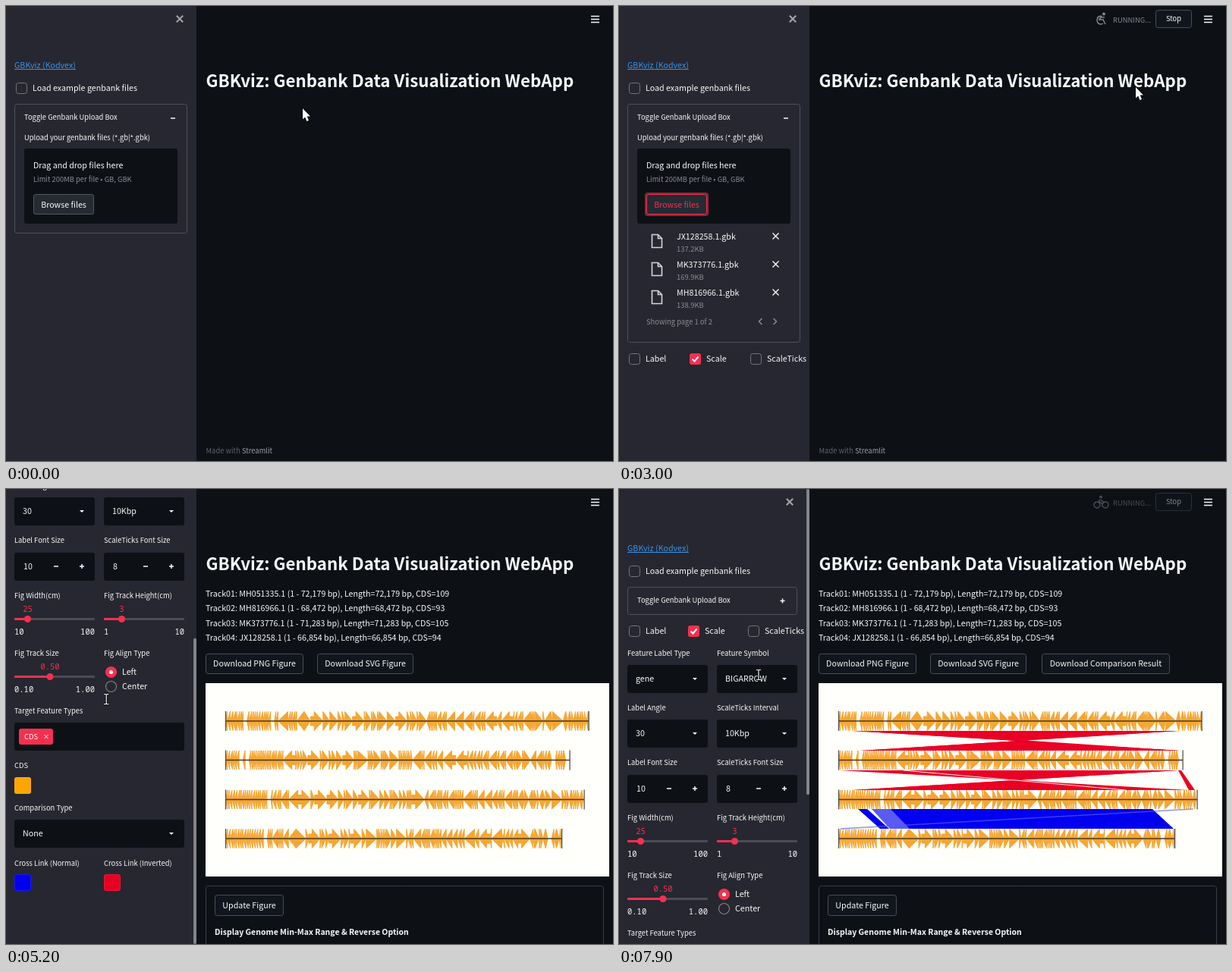
These frames come from a looping animation (800 by 600 pixels, 8000 ms). An HTML page with a canvas:

```html
<!DOCTYPE html>
<html lang="en">
<head>
<meta charset="utf-8">
<title>GBKviz</title>
<style>
html, body { margin: 0; width: 100%; height: 100%; overflow: hidden; background: #0e1117; }
canvas { display: block; }
</style>
</head>
<body>
<canvas id="stage" width="800" height="600"></canvas>
<script>
const g = document.getElementById('stage').getContext('2d');
const APP = "'Noto Sans CJK JP','Noto Sans CJK SC','Noto Sans CJK','Noto Sans',sans-serif";
const DESK = "'Noto Sans','Noto Sans CJK JP',sans-serif";
const MONO = "'Noto Sans Mono','Liberation Mono',monospace";
const WHITE = '#fafafa', DARK = '#0d1116', PANEL = '#262730', RED = '#f5304f', GREY = '#8b8d94', LINE = '#50525b';
const BODY = 10.7, SMALL = 9.4;

// ---------- drawing helpers ----------
function text(s, x, cy, o = {}) {
  const size = o.size || BODY;
  g.font = `${o.bold ? 'bold ' : ''}${size}px ${o.font || APP}`;
  g.textAlign = o.align || 'left';
  g.fillStyle = o.color || WHITE;
  g.fillText(s, x, cy + size * 0.36);
}
const small = (s, x, y, color) => text(s, x, y, { size: SMALL, color });

function box(x1, y1, x2, y2, fill, stroke, r = 3) {
  g.beginPath();
  g.roundRect(x1, y1, x2 - x1, y2 - y1, r);
  if (fill) { g.fillStyle = fill; g.fill(); }
  if (stroke) {
    g.beginPath();
    g.roundRect(x1 + .5, y1 + .5, x2 - x1 - 1, y2 - y1 - 1, r);
    g.strokeStyle = stroke; g.lineWidth = 1; g.stroke();
  }
}
function poly(points, fill, outline) {
  g.beginPath();
  points.forEach(p => g.lineTo(...p));
  g.closePath();
  g.fillStyle = fill; g.fill();
  if (outline) { g.strokeStyle = fill; g.lineWidth = outline; g.stroke(); }
}
function disc(x, y, r, fill) {
  g.beginPath(); g.arc(x, y, r, 0, 7); g.fillStyle = fill; g.fill();
}
function stroke(d, x, y, color, width = 1.5) {
  g.save(); g.translate(x, y);
  g.strokeStyle = color; g.lineWidth = width; g.stroke(new Path2D(d));
  g.restore();
}
function clipped(x, y, w, h, draw) {
  g.save(); g.beginPath(); g.rect(x, y, w, h); g.clip(); draw(); g.restore();
}
const minus = (x, y, color = WHITE) => stroke('M-3 0H3', x, y, color);
const plus = (x, y, color = WHITE) => stroke('M-3 0H3M0-3V3', x, y, color);
const cross = (x, y, r, color, w) => stroke(`M${-r} ${-r}L${r} ${r}M${r} ${-r}L${-r} ${r}`, x, y, color, w);
const caret = (x, y, color = WHITE, r = 3) => poly([[x - r, y - r / 2], [x + r, y - r / 2], [x, y + r / 2]], color);

function button(label, x1, y1, x2, y2, size) {
  box(x1, y1, x2, y2, '#11151d', '#4a4c54');
  text(label, (x1 + x2) / 2, (y1 + y2) / 2, { align: 'center', size });
}

// ---------- timeline ----------
function track(keys, t) {
  const i = keys.findIndex(k => k[0] > t);
  if (i < 0) return keys[keys.length - 1].slice(1);
  if (i === 0) return keys[0].slice(1);
  const [a, b] = [keys[i - 1], keys[i]], u = (t - a[0]) / (b[0] - a[0]);
  return a.slice(1).map((v, k) => v + (b[k + 1] - v) * u);
}
const pointerPath = [
  [0, 391, 135], [100, 306, 157], [200, 306, 157], [500, 80, 260], [1100, 80, 260], [1500, 300, 178],
  [1800, 303, 246], [2000, 303, 246], [2200, 690, 80], [2400, 690, 80], [2500, 681, 107], [3000, 681, 107],
  [3400, 215, 146], [3800, 215, 146], [4200, 134, 232], [5100, 134, 232], [5600, 125, 458], [5800, 125, 458],
  [6200, 98, 397], [6700, 98, 397], [7300, 229, 402], [7500, 229, 402], [7800, 184, 245]];
const scrollPath = [[4600, 0], [4900, 293], [6700, 293], [7000, 0]];
const expandPath = [[2700, 134], [2800, 278], [3400, 278], [3700, 0]];
const within = (t, a, b) => t >= a && t < b;

// ---------- sidebar ----------
function checkbox(x, y, label, labelX, checked) {
  box(x, y - 7, x + 15, y + 8, checked ? RED : null, checked ? RED : '#74757c');
  if (checked) stroke('M-4 0L-1 3L4-3', x + 7.5, y + .5, '#fff', 2);
  text(label, labelX, y);
}
function select(x, y, width, value, border) {
  box(x, y - 18, x + width, y + 19, DARK, border);
  text(value, x + 11, y + .5);
  caret(x + width - 17, y + .5);
}
function numberInput(x, y, value, hot) {
  box(x, y - 18, x + 106, y + 19, DARK);
  if (hot) box(x + 72, y - 18, x + 106, y + 19, RED);
  text(value, x + 12, y);
  minus(x + 55, y); plus(x + 89, y);
}
function slider(x, y, value, at, lo, hi) {
  const mono = { font: MONO, size: 10.5 };
  text(value, at, y - 13, { ...mono, color: RED, align: 'center' });
  box(x, y - 1, x + 106, y + 2, '#4b4c55', null, 1);
  box(x, y - 1, at, y + 2, RED, null, 1);
  disc(at, y + .5, 4.6, RED);
  text(lo, x, y + 17, mono);
  text(hi, x + 106, y + 17, { ...mono, align: 'right' });
}
function radio(y, label, on) {
  disc(138.5, y, 7.6, on ? RED : '#85868c');
  disc(138.5, y, on ? 2.6 : 6.5, on ? '#fff' : PANEL);
  text(label, 153, y);
}

function uploader(t, right, extra) {
  small('Upload your genbank files (*.gb|*.gbk)', 24, 173.5);
  box(24, 188, right - 13, 287, DARK);
  text('Drag and drop files here', 36, 210);
  small('Limit 200MB per file • GB, GBK', 36, 228.5, GREY);
  const hot = within(t, 500, 3300);
  if (hot) box(34, 246, 118, 277, '#8d2539', null, 4);
  box(36, 248, 116, 275, '#262a33', hot ? RED : '#555760');
  text('Browse files', 76, 262, { align: 'center', color: hot ? RED : WHITE });
  if (extra <= 134 && t < 2800) return;
  [['JX128258.1.gbk', '137.2KB'], ['MK373776.1.gbk', '169.9KB'], ['MH816966.1.gbk', '138.9KB']].forEach(([name, size], i) => {
    const y = 304 + 37 * i;
    stroke('M-6-8H2L7-3V9H-6ZM2-8V-3H7', 49.5, y + 5.5, '#d5d6d9', 1.6);
    text(name, 76, y);
    small(size, 76, y + 17, GREY);
    cross(206.5, y - .5, 4, WHITE, 1.4);
  });
  small('Showing page 1 of 2', 36, 416.5, GREY);
  stroke('M2-4L-2 0L2 4M17-4L21 0L17 4', 186.5, 416, GREY);
}

function widgets(t) {
  [[11, 'Feature Label Type', 'gene', 'Label Angle', '30', 'Label Font Size', '10'],
   [129, 'Feature Symbol', 'BIGARROW', 'ScaleTicks Interval', '10Kbp', 'ScaleTicks Font Size', '8']]
    .forEach(([x, l1, v1, l2, v2, l3, v3], i) => {
      small(l1, x, 216.5); select(x, 250, 106, v1);
      small(l2, x, 288.5); select(x, 322, 106, v2);
      small(l3, x, 361); numberInput(x, 395, v3, i && within(t, 7300, 7600));
    });
  small('Fig Width(cm)', 11, 433.5); slider(11, 464, '25', 28.5, '10', '100');
  small('Fig Track Height(cm)', 129, 433.5); slider(129, 464, '3', 152.5, '1', '10');
  small('Fig Track Size', 11, 509.5); slider(11, 540, '0.50', 58, '0.10', '1.00');
  small('Fig Align Type', 129, 509.5);
  radio(534.5, 'Left', true); radio(553.5, 'Center', false);
  small('Target Feature Types', 11, 585.5);
  box(11, 601, 235, 638, DARK);
  box(17, 609, 62, 630, RED); small('CDS', 24, 619.5); cross(53, 619.5, 2.5, WHITE, 1);
  const rim = 'rgba(250,250,250,.1)';
  small('CDS', 11, 658); box(11, 673, 33, 695, '#ffa500', rim);
  small('Comparison Type', 11, 714);
  const open = within(t, 5800, 6500);
  select(11, 747, 224, t < 6500 ? 'None' : 'Protein Many-to-Many', open && '#d8354f');
  if (open) box(50, 740, 51, 755, WHITE, null, 0);
  small('Cross Link (Normal)', 11, 786.5); box(11, 801, 33, 823, '#0000f0', rim);
  small('Cross Link (Inverted)', 129, 786.5); box(129, 801, 151, 823, '#e60022', rim);
}

function dropdown(py) {
  g.save();
  g.shadowColor = 'rgba(0,0,0,.5)'; g.shadowBlur = 8;
  box(11, 273, 235, 430, DARK);
  g.restore();
  const row = Math.floor((py - 274) / 30), hot = row > 4 ? 0 : row;
  box(11, 280 + hot * 30, 235, 310 + hot * 30, PANEL, null, 0);
  ['None', 'Nucleotide One-to-One', 'Nucleotide Many-to-Many', 'Protein One-to-One', 'Protein Many-to-Many']
    .forEach((s, i) => text(s, 23, 294.5 + 30 * i));
}

function sidebar(t, py) {
  const scroll = Math.round(track(scrollPath, t)[0]), extra = Math.round(track(expandPath, t)[0]);
  const full = t >= 3100, right = full ? 235 : 239;
  box(0, 0, 251, 600, PANEL, null, 0);
  clipped(0, 0, 249, 600, () => {
    g.translate(0, -scroll);
    cross(full ? 225 : 229, 17, 4.2, '#a0a1a6', 2.2);
    const link = 'GBKviz (Kodvex)';
    text(link, 11, 78, { color: '#3795ec' });
    box(11, 83, 11 + g.measureText(link).width, 84, '#3795ec', null, 0);
    checkbox(13, 108, 'Load example genbank files', 35);
    box(11, 129, right, 166 + extra, null, LINE);
    small('Toggle Genbank Upload Box', 24, 146.5);
    if (extra) {
      minus(right - 19, 148);
      clipped(11, 160, 228, 5 + extra, () => uploader(t, right, extra));
    } else plus(215.5, 147.5);
    if (t >= 2800) {
      g.translate(0, extra);
      checkbox(13, 187, 'Label', 35);
      checkbox(full ? 91 : 93, 187, 'Scale', full ? 113 : 115, true);
      checkbox(full ? 170 : 173, 187, 'ScaleTicks', full ? 192 : 195);
      if (full) widgets(t);
    }
  });
  const open = within(t, 5800, 6500);
  if (open) dropdown(py);
  else if (full) {
    const k = 600 / (893 + extra);
    box(247, scroll * k, 251, scroll * k + 600 * k, '#84858a', null, 2);
  }
}

// ---------- genome figure ----------
const ENDS = [768, 743, 762, 732.5], MIDS = [306, 357.5, 409.5, 461];

function genome(x0, x1, y, seed) {
  const random = () => (seed = (seed * 16807) % 2147483647) / 2147483647;
  for (let x = x0; x < x1 - 1;) {
    const f = (x - x0) / (x1 - x0), edge = f < .12 || f > .92;
    const w = Math.min(edge ? 1.8 + random() * 2 : 2 + random() ** 3 * 15, x1 - x);
    const leftward = f < .2 || (f > .54 && f < .82) || (f > .82 && random() < .5);
    const tip = leftward ? x : x + w, base = leftward ? x + w : x;
    const neck = w > 14 ? base + (tip - base) * .3 : base;
    poly([[tip, y], [neck, y - 12.5], [neck, y - 6], [base, y - 6], [base, y + 6], [neck, y + 6], [neck, y + 12.5]], '#f5a632', 1);
    x += w + (edge && random() < .14 ? 5 : .1);
  }
  box(x0, y - .7, x1, y + .7, '#4b3823', null, 0);
  box(x0 - .5, y - 13, x0 + .7, y + 13, '#444', null, 0);
  box(x1 - .5, y - 13, x1 + .7, y + 13, '#444', null, 0);
}

// An inverted match: two facing spans whose ends cross over.
const bowtie = (y, a, b, c, d, fill) => poly([[a, y], [b, y], [c, y + 26], [d, y + 26]], fill);

function figure(compared) {
  box(263, 256, 795, 511, '#fffffb', null, 0);
  MIDS.forEach((y, i) => genome(289.5, ENDS[i], y, 7919 * (i + 3)));
  if (!compared) return;
  const red = '#ea0024', blue = '#0000f0', pale = '#5a5af4';
  bowtie(319, 308, 738, 318, 738, red);
  bowtie(319, 350, 738, 318, 738, red);
  bowtie(319, 308, 690, 360, 738, red);
  bowtie(371, 290, 737, 308, 750, red);
  bowtie(371, 380, 737, 308, 690, red);
  stroke('M375 371L668 397', 0, 0, '#ffe6e6', 1);
  poly([[737, 371], [741, 371], [759, 397], [751, 397]], red);
  poly([[315, 422], [327, 422], [356, 448], [344, 448]], blue);
  poly([[333, 422], [359, 422], [384, 448], [357, 448]], pale);
  poly([[358, 422], [703, 422], [731, 448], [383, 448]], blue);
  stroke('M757 422L292 448', 0, 0, pale + 'aa', 1.4);
}

// ---------- main area ----------
const RECORDS = [['MH051335.1', '72,179', 109], ['MH816966.1', '68,472', 93], ['MK373776.1', '71,283', 105], ['JX128258.1', '66,854', 94]];

function form(top) {
  box(263, top, 788, 1000, null, '#3a3c46');
  button('Update Figure', 275, top + 12, 366, top + 40);
  text('Display Genome Min-Max Range & Reverse Option', 275, top + 61.5, { bold: true, size: 10.5 });
  RECORDS.forEach(([name, size], i) => {
    const y = top + 125 + Math.round(72.3 * i);
    small(`${name} (Max=${size} bp)`, 275, y - 34);
    small('Reverse', 714, y - 34);
    [[275, 482], [495, 702], [714, 778]].forEach(([a, b]) => box(a, y - 19, b, y + 18, PANEL));
    text('1', 287, y); text(size.replace(',', ''), 506, y); text('No', 725, y);
    minus(432, y - .5, GREY); plus(465, y - .5);
    minus(652, y - .5); plus(685, y - .5, GREY);
    caret(760.5, y);
  });
}

const RUN_ICONS = [
  'M0-4L-3 2L1 4L0 9M-3 2L-5 6H-8M0-3L3 0H6M-1-3L-5-2L-6 1',
  'M-2 4A4 4 0 1 1-2 3.9M9 4A4 4 0 1 1 9 3.9M-2-3L-4 0L1 2V6M-1-3L2 0H5',
  'M0-4L-3 1H2L5 7M-4-2A5 5 0 1 0 2 6M0-4L-4-3L-6-1M-1-2H4'];

function header(t) {
  if (within(t, 2800, 4200) || t >= 6800) {
    g.save();
    if (t >= 7800) g.globalAlpha = .5;
    const icon = Math.floor(t / 350) % 3;
    stroke(RUN_ICONS[icon], 636, 17, '#85878c', 1.5);
    disc(icon === 1 ? 635 : 639, 10.5, 2, '#85878c');
    small('RUNNING...', 651, 18.5, '#85878c');
    button('Stop', 707, 5, 755, 29, SMALL);
    g.restore();
  }
  stroke('M0 0H11M0 4H11M0 8H11', 771, 13.5, WHITE, 1.3);
}

function mainArea(t) {
  text('GBKviz: Genbank Data Visualization WebApp', 263.5, 98.7, { size: 22.3, bold: true });
  if (t < 3900) {
    small('Made with ', 263.5, 587, '#5f6269');
    small('Streamlit', 263.5 + g.measureText('Made with ').width, 587, '#9b9da2');
  } else {
    RECORDS.forEach(([name, size, cds], i) =>
      text(`Track0${i + 1}: ${name} (1 - ${size} bp), Length=${size} bp, CDS=${cds}`, 263, 138 + 19.4 * i));
    const compared = t >= 7800, rerunning = within(t, 6900, 7800), loading = t < 4600;
    if (!rerunning) {
      button('Download PNG Figure', 263, 217, 392, 244);
      button('Download SVG Figure', 410, 217, 537, 244);
      if (compared) button('Download Comparison Result', 557, 217, 726, 244);
      if (loading) {
        box(263, 256, 788, 301, '#0d243b');
        text('Loading...', 276, 279, { color: '#3d9de8' });
      } else figure(compared);
    }
    form(rerunning ? 229 : loading ? 313 : 523);
  }
  header(t);
}

// ---------- file dialog ----------
const FILES = [['MH051335.1.gbk', '174.0'], ['MH816966.1.gbk', '138.9'], ['MK373776.1.gbk', '169.9'],
  ['JX128258.1.gbk', '137.2'], ['MK373777.1.gbk', '189.3'], ['MN176217.gbk', '154.8']];
const PLACES = [
  ['最近開いたファイル', 'M7 0A7 7 0 1 1 7-.1M0-4V0H3'], ['ホーム', 'M-7 0L0-6L7 0M-5 0V6H-2V2H2V6H5V0'],
  ['デスクトップ', 'M-6 5V-5H-1L1-3H6V5ZM-6-1H7'], ['Documents', 'M-5-6H2L5-3V6H-5ZM2-6V-2H5'],
  ['Downloads', 'M0-6V5M-5 0L0 5L5 0'], ['Music', 'M-3 4V-5H5V3M-6 4H-3M2 3H5M-3-2H5'],
  ['Pictures', 'M-6-3H-3L-2-5H2L3-3H6V5H-6ZM2 1A2 2 0 1 1 2 .9'], ['Videos', 'M-6-3H2V4H-6ZM2 0L6-3V4L2 1M-5-1H1M-5 2H1'],
  ['Removable', 'M-4 1L0-4L4 1Z']];
const desk = (s, x, y, o) => text(s, x, y, { font: DESK, size: /[ぁ-龠]/.test(s) ? 14.7 : 14, color: '#3c3c3c', ...o });

function shade(y1, y2, c1, c2) {
  const fill = g.createLinearGradient(0, y1, 0, y2);
  fill.addColorStop(0, c1); fill.addColorStop(1, c2);
  return fill;
}

function dialog(t) {
  box(0, 0, 800, 600, 'rgba(0,0,0,.4)', null, 0);
  g.save();
  g.shadowColor = '#000'; g.shadowBlur = 16; g.shadowOffsetY = 4;
  box(25, 58, 778, 425, '#f1f1ec', null, [6, 6, 0, 0]);
  g.restore();
  box(25, 58, 778, 99, shade(58, 99, '#53514a', '#3c3a35'), null, [6, 6, 0, 0]);
  const pressed = within(t, 2400, 2700);
  [[34, 145], [617, 650], [658, 770]].forEach(([a, b], i) =>
    box(a, 62, b, 96, pressed && i === 2 ? '#34322d' : shade(62, 96, '#55534b', '#45433d'), '#34322e', 4));
  const pale = { color: '#e6e3da' };
  desk('キャンセル(C)', 42, 79, pale);
  desk('ファイルを開く', 401, 79, { ...pale, bold: true, align: 'center' });
  desk('開く(O)', 713.5, 79, { ...pale, align: 'center' });
  stroke('M3 0A4 4 0 1 1 3-.1M2 3L7 8', 632, 77, '#eee', 2);

  clipped(25, 99, 190, 280, () => {
    box(25, 99, 65, 379, '#4b4941', null, 0);
    box(65, 99, 213, 379, '#5c5a4f', null, 0);
    PLACES.forEach(([name, icon], i) => {
      const y = 118 + 32 * i + (i > 7 ? 10 : 0);
      stroke(icon, 45, y, '#f0eee8', 1.8);
      clipped(65, 99, 144, 280, () => desk(name, 77, y, { color: '#eeece4' }));
    });
    box(208, 99, 213, 252, '#e06a42', null, 0);
    box(213, 99, 215, 379, '#d8d6d0', null, 0);
  });

  box(222, 107, 756, 132, shade(107, 132, '#fcfcfa', '#ececE8'), '#c4c2bc');
  box(593, 107, 733, 132, '#d9d8d4', '#b9b7b1', 0);
  [245, 318, 442, 512].forEach(x => box(x, 107, x + 1, 132, '#c8c6c0', null, 0));
  poly([[230, 119.5], [235, 115], [235, 124]], '#333');
  poly([[747, 119.5], [743, 115], [743, 124]], '#999');
  [['Project', 257], ['Bioinformatics', 330], ['GBKviz', 454], ['example', 524], ['EscherichiaPhage', 605]]
    .forEach(([s, x]) => desk(s, x, 120, { size: 14.3 }));

  box(215, 140, 778, 379, '#fffffd', null, 0);
  [['名前', 221], ['サイズ', 573], ['型', 643], ['更新日時', 685]].forEach(([s, x]) => desk(s, x, 154));
  [566, 636, 678].forEach(x => box(x, 140, x + 1, 167, '#dddcd8', null, 0));
  box(215, 167, 778, 168, '#dddcd8', null, 0);
  caret(764, 154, '#333', 5);
  const chosen = t < 1500 ? 0 : t < 1800 ? 1 : 4;
  FILES.forEach(([name, size], i) => {
    const y = 180 + 23 * i, on = i < chosen, color = { color: on ? '#fff' : '#3c3c3c' };
    if (on) box(215, y - 12, 778, y + 11, '#e36c44', null, 0);
    box(223, y - 9, 237, y + 7, '#f0f0ee', '#a5a5a2', 1);
    stroke('M8 0V4H13', 223, y - 8, '#a5a5a2', 1);
    desk(name, 246, y, color);
    desk(size + ' kB', 631, y, { ...color, align: 'right' });
    desk('Text', 644, y, color);
    desk('18 11月 2021', 771, y, { ...color, size: 13.8, align: 'right' });
  });
  box(25, 379, 778, 380, '#cfcdc7', null, 0);
  box(618, 387, 771, 418, shade(387, 418, '#ffffff', '#ecece8'), '#bdbbb5', 4);
  desk('カスタム ファイル', 625, 403);
  caret(758, 403, '#333', 5);
}

// ---------- pointer ----------
const SHAPES = {
  arrow: new Path2D('M0 0V14.5L3.2 11.6L5.4 17L8 16L5.8 10.6H10Z'),
  hand: new Path2D('M-1 1Q0-1 1.5 1V6L8 7.5V12L6.5 15H0L-4 9Q-3.5 7.5-1 9.5Z'),
};
function pointer(t, x, y) {
  const hand = within(t, 500, 700) || within(t, 3300, 4000) || within(t, 5900, 6800);
  const beam = within(t, 4200, 5900) || t >= 7700;
  if (beam) {
    const bar = 'M-3-6.5H-1L0-6L1-6.5H3M0-6V6M-3 6.5H-1L0 6L1 6.5H3';
    stroke(bar, x, y, '#000', 3);
    stroke(bar, x, y, '#fff', 1.2);
    return;
  }
  g.save(); g.translate(x, y);
  const shape = hand ? SHAPES.hand : SHAPES.arrow;
  g.lineWidth = 1.6; g.strokeStyle = '#000'; g.stroke(shape);
  g.fillStyle = '#fff'; g.fill(shape);
  g.restore();
}

function render(now) {
  const t = Math.floor((now % 8000) / 100) * 100;
  const [x, y] = track(pointerPath, t);
  box(0, 0, 800, 600, DARK, null, 0);
  mainArea(t);
  sidebar(t, y);
  if (within(t, 700, 2700)) dialog(t);
  pointer(t, x, y);
}

const start = performance.now();
(function loop() {
  render(performance.now() - start);
  requestAnimationFrame(loop);
})();
</script>
</body>
</html>
```
